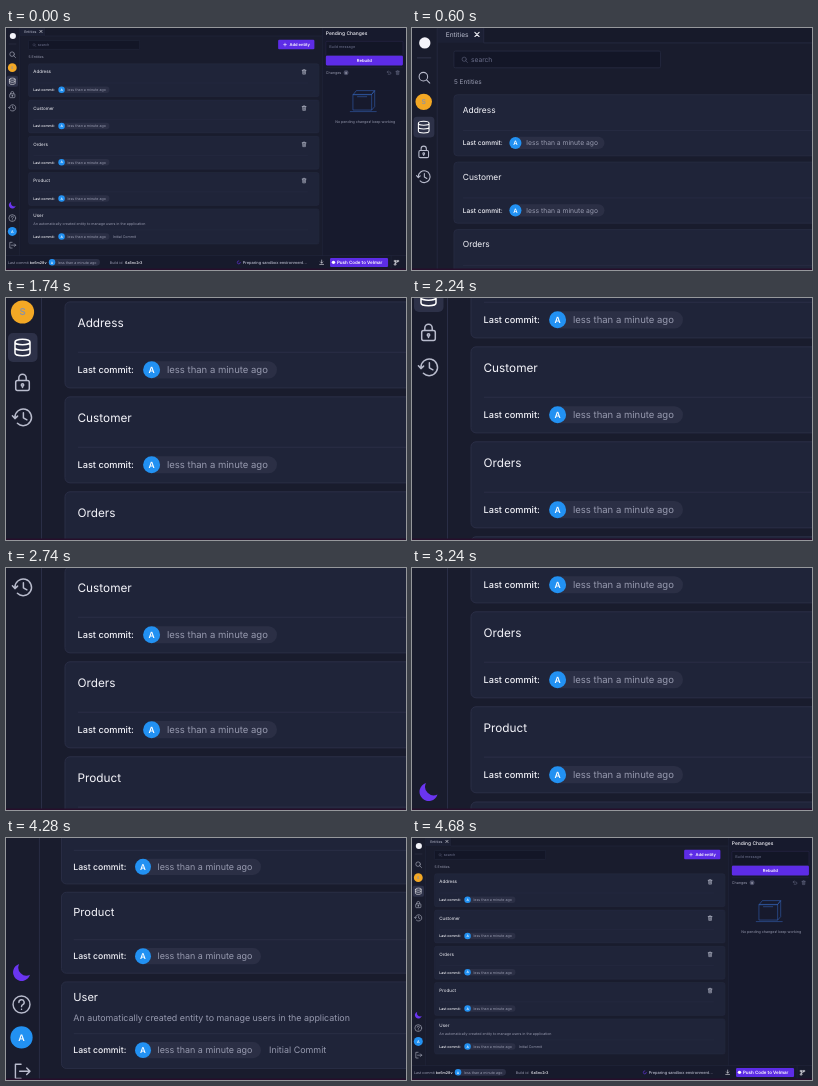
Write an HTML page that moves like this. It is 400x242 px and loops after 5 s.

```html
<!DOCTYPE html>
<html lang="en">
<head>
<meta charset="utf-8">
<title>Entities</title>
<style>
html, body { margin: 0; width: 100%; height: 100%; overflow: hidden; background: #191c2d; }
svg { display: block; width: 100%; height: 100%; }
text { font-family: Inter, "Open Sans", sans-serif; text-rendering: geometricPrecision; white-space: pre; }
.icon { fill: none; stroke: #b9bccd; stroke-width: 1.5; stroke-linecap: round; stroke-linejoin: round; }
</style>
</head>
<body>
<svg id="stage" viewBox="0 0 400 242" preserveAspectRatio="none">
  <g id="world"></g>
  <rect y="240.5" width="400" height="1.5" fill="#260f2b"/>
</svg>
<script>
const ZOOM = 2.62, LOOP = 5000;
const ZOOM_IN = 340, PAN = 840, ZOOM_OUT = 4180, ZOOM_TIME = 500;
const PAN_SPEED = 0.1;
const W = 400 * ZOOM, H = 242 * ZOOM;
const C = {
  bg: '#191c2d', card: '#1f2439', line: '#2a2e46', dark: '#131627', pill: '#2b2f45',
  white: '#f4f4fa', soft: '#b9bccd', grey: '#979aaf', dim: '#6c708c',
  blue: '#2291f2', violet: '#5d2ce6', moon: '#6a35f0', orange: '#f3a825'
};
const world = document.getElementById('world');

function add(tag, attrs, body = '') {
  const el = document.createElementNS('http://www.w3.org/2000/svg', tag);
  for (const key in attrs) el.setAttribute(key, attrs[key]);
  el.textContent = body;
  world.append(el);
}
function box(x, y, width, height, fill, rx = 0, stroke = 'none') {
  add('rect', { x, y, width, height, fill, rx, stroke });
}
function dot(cx, cy, r, fill) {
  add('circle', { cx, cy, r, fill });
}
function line(x1, y1, x2, y2, stroke = C.line) {
  add('path', { d: `M${x1} ${y1}L${x2} ${y2}`, stroke, 'stroke-width': 1 });
}
// y is the middle of the capital letters
function label(x, y, body, size, fill, weight = 400, anchor = 'start') {
  add('text', {
    x, y: y + size * 0.364, fill, 'font-size': size,
    'font-weight': weight, 'text-anchor': anchor
  }, body);
}
function icon(x, y, d, scale = 1, stroke = C.soft) {
  add('path', {
    d, class: 'icon', transform: `translate(${x} ${y}) scale(${scale})`, style: `stroke:${stroke}`
  });
}

const ICON = {
  search: 'M5 -1A6 6 0 1 1 -7 -1A6 6 0 1 1 5 -1M3.5 3.5L8 8',
  base: 'M-7.5 -5.5A7.5 2.8 0 0 1 7.5 -5.5A7.5 2.8 0 0 1 -7.5 -5.5V5.5A7.5 2.8 0 0 0 7.5 5.5V-5.5M-7.5 0A7.5 2.8 0 0 0 7.5 0',
  lock: 'M-5 -2H5Q6.8 -2 6.8 0V6Q6.8 8 5 8H-5Q-6.8 8 -6.8 6V0Q-6.8 -2 -5 -2M-3.7 -2V-4.5A3.7 3.7 0 0 1 3.7 -4.5V-2M1.2 2.4A1.2 1.2 0 1 1 -1.2 2.4A1.2 1.2 0 1 1 1.2 2.4M0 3.6V5',
  history: 'M-7.5 0A8.3 8.3 0 1 1 -5 6M-10 -1.5L-7.5 1.3L-4.8 -1.2M1 -4.5V0.5L4.5 2.5',
  help: 'M9 0A9 9 0 1 1 -9 0A9 9 0 1 1 9 0M-2.8 -2.2A2.8 2.8 0 1 1 1.4 .2Q0 1 0 2.3M0 5V5.2',
  logout: 'M-1 -7.5H-7V7.5H-1M-2.5 0H8.5M5 -3.5L8.5 0L5 3.5',
  trash: 'M-5 -4H5M-2 -4V-6H2V-4M-4 -4L-3.5 6H3.5L4 -4M-1.2 -1V3.5M1.2 -1V3.5',
  undo: 'M-5 -2H3A3 3 0 0 1 3 5H-2M-2 -5L-5 -2L-2 1',
  close: 'M-3 -3L3 3M3 -3L-3 3',
  plus: 'M-3.5 0H3.5M0 -3.5V3.5',
  download: 'M0 -6V2M-3 -1L0 2L3 -1M-5 5.5H5',
  branch: 'M-3 -3V4M4 -3Q4 1 -3 2M-5 -5H-1V-2H-5ZM2 -5H6V-2H2ZM-5 4H-1V7H-5Z',
  spinner: 'M0 -4A4 4 0 1 0 4 0',
  crate: 'M-25 -16L-17 -26H31L23 -16ZM-25 -16H23V25H-25ZM23 -16L31 -26V16L23 25M-33 29H35M-14 -10H10'
};

function avatar(x, y, r, size) {
  dot(x, y, r, C.blue);
  label(x, y, 'A', size, '#fff', 600, 'middle');
}
function agoPill(x, y) {
  box(x, y - 8.6, 133, 17.2, C.pill, 8.6);
  avatar(x + 7.6, y, 8.5, 8.5);
  label(x + 23, y, 'less than a minute ago', 9.5, C.grey);
}
function commitRow(y) {
  line(72, y - 17.5, 791, y - 17.5);
  label(71.5, y, 'Last commit:', 9.2, C.white, 500);
  agoPill(138, y);
}

function drawMain() {
  box(0, 0, W, H, C.bg);
  box(36, 0, 793, 21, '#171a2a');
  box(36, 0, 65, 21, '#1c2034');
  line(101, 0, 101, 21);
  line(101, 21, 829, 21);
  label(47.5, 9, 'Entities', 9.3, C.soft);
  icon(91.5, 9, ICON.close, 1, C.white);

  box(59, 32.5, 291, 23.5, C.dark, 2, C.line);
  icon(74, 44.5, ICON.search, 0.5, C.dim);
  label(83, 44.5, 'search', 9.4, C.dim);
  label(59, 75, '5 Entities', 9.1, C.grey);
  box(713, 31, 95, 25, C.violet, 3);
  icon(731, 43.5, ICON.plus, 1, '#fff');
  label(743, 43.5, 'Add entity', 10.7, '#fff', 600);

  ['Address', 'Customer', 'Orders', 'Product'].forEach((name, i) => {
    const y = 93.9 + i * 94.95;
    box(59, y, 761, 86, C.card, 5, C.line);
    label(71.5, y + 20.8, name, 11.8, C.white);
    icon(781, y + 21, ICON.trash);
    commitRow(y + 67.9);
  });
  box(59, 474, 761, 92, C.card, 5, C.line);
  label(71.5, 489.7, 'User', 11.8, C.white);
  label(71.5, 512.3, 'An automatically created entity to manage users in the application', 9.45, C.grey);
  commitRow(546.5);
  label(279.5, 546.5, 'Initial Commit', 9.5, C.grey);
}

function drawSidebar() {
  box(0, 0, 35.5, H, '#191c2d');
  line(35.5, 0, 35.5, H);
  dot(18, 21, 8, C.white);
  line(7, 42, 27, 42, '#3b3e57');
  icon(17, 69.5, ICON.search);
  dot(16.5, 104, 11.6, C.orange);
  label(16.5, 104, 'S', 9.5, '#8d93a5', 600, 'middle');
  box(2, 125, 29.5, 29, '#2d3148', 5);
  icon(16.5, 139.5, ICON.base, 1, '#fff');
  icon(16.5, 174.5, ICON.lock);
  icon(16.4, 209.3, ICON.history);
  add('path', { d: 'M14 455A9.2 9.2 0 1 0 25.5 466.5A8.6 8.6 0 0 1 14 455Z', fill: C.moon });
  icon(16.5, 498, ICON.help);
  avatar(16.5, 533, 11.8, 9.5);
  icon(17, 569, ICON.logout);
}

function drawPanel() {
  box(829, 0, W - 829, H, '#171a2d');
  line(829, 0, 829, H);
  label(838, 14.5, 'Pending Changes', 12.9, C.white, 500);
  box(838, 35, 202, 37, C.dark, 2, '#37305f');
  label(847, 48.5, 'Build message', 9.8, C.dim);
  box(838, 73, 202, 25, C.violet, 3);
  label(939, 85.5, 'Rebuild', 11, '#fff', 600, 'middle');
  line(838, 104, 1040, 104);
  label(838, 117, 'Changes', 9.6, C.grey);
  dot(891, 117, 6.5, '#4a4d66');
  label(891, 117, '0', 7.5, C.white, 400, 'middle');
  icon(1003, 117, ICON.undo, 0.85, C.dim);
  icon(1026, 117, ICON.trash, 0.85, C.dim);
  icon(935, 190, ICON.crate, 1, '#3462b5');
  label(941, 245, 'No pending changes! keep working', 9.4, C.grey, 400, 'middle');
}

function drawFooter() {
  const y = 614;
  box(0, 596, W, H - 596, '#171a2c');
  line(0, 596, W, 596);
  label(5, y, 'Last commit', 9.5, C.grey);
  label(62.5, y, 'be6m28v', 9.6, C.white, 500);
  agoPill(113, y);
  label(272, y, 'Build id', 9.5, C.grey);
  label(312, y, '6a5nc2r3', 9.8, C.white, 500);
  icon(610, y, ICON.spinner, 1, C.moon);
  label(620, y, 'Preparing sandbox environment...', 10.4, C.soft, 500);
  icon(827, y, ICON.download, 1, C.white);
  box(849, 602.5, 152, 24, C.violet, 3);
  dot(858, y, 4.5, '#fff');
  label(867, y, 'Push Code to Velmar', 11.8, '#fff', 600);
  line(1009, 596, 1009, H);
  icon(1023, y, ICON.branch, 1, C.white);
}

drawMain();
drawSidebar();
drawPanel();
drawFooter();

function ease(p) {
  p = Math.min(1, Math.max(0, p));
  return (1 - Math.cos(Math.PI * p)) / 2;
}

function render(t) {
  const enter = ease((t - ZOOM_IN) / ZOOM_TIME);
  const leave = ease((t - ZOOM_OUT) / ZOOM_TIME);
  const zoom = enter - leave;
  const panned = PAN_SPEED * Math.max(0, Math.min(t, ZOOM_OUT) - PAN);
  const scale = (1 + (ZOOM - 1) * zoom) / ZOOM;
  world.setAttribute('transform', `translate(0 ${-panned * (1 - leave)}) scale(${scale})`);
}

const start = performance.now();
function tick() {
  const t = (performance.now() - start) % LOOP;
  render(Math.floor(t / 20) * 20);
  requestAnimationFrame(tick);
}
render(0);
requestAnimationFrame(tick);
</script>
</body>
</html>
```
